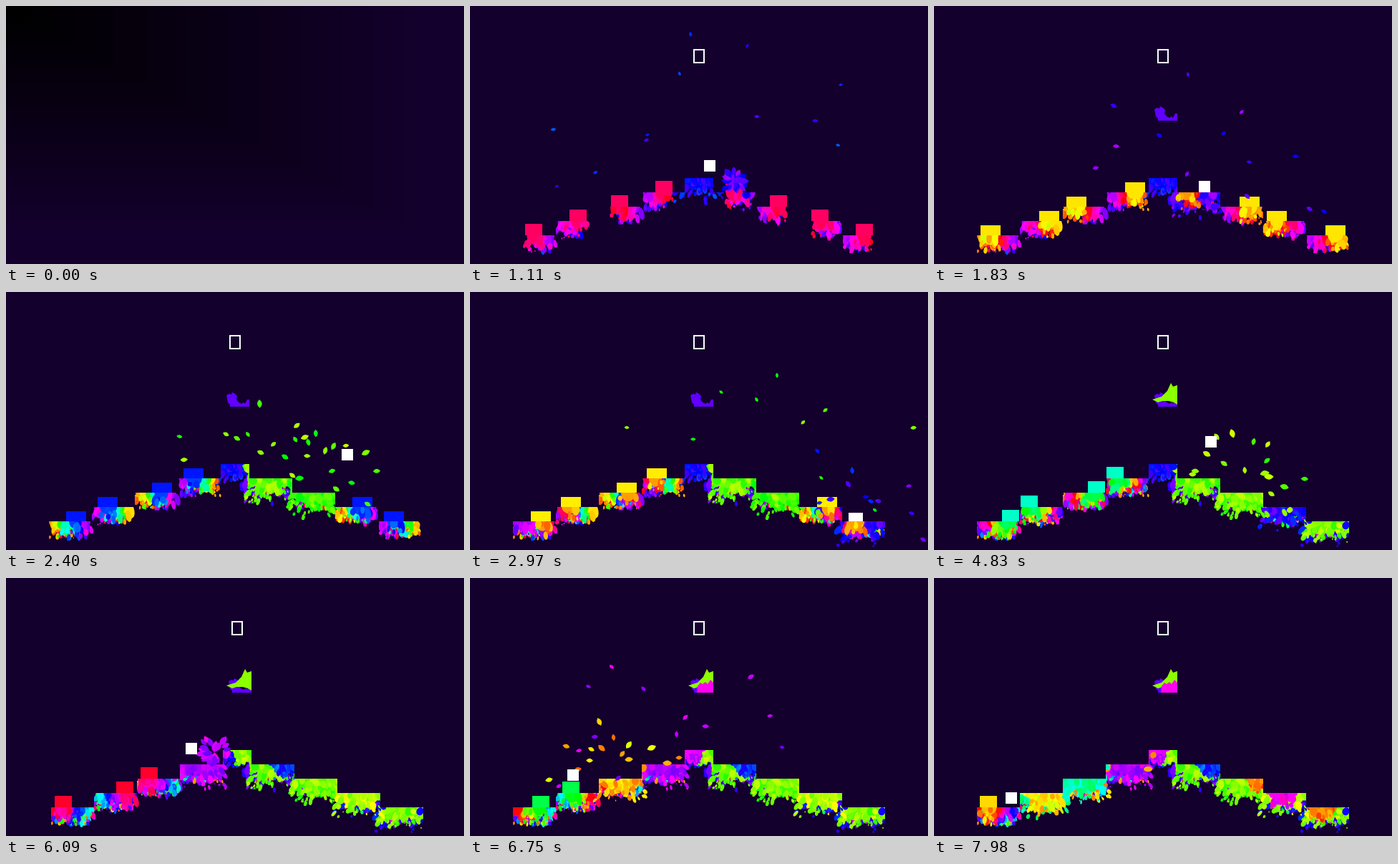
An HTML page with a canvas for the animation above (8 s loop, 640 px wide and 360 px high).

```html
<!DOCTYPE html>
<html lang="en">
<head>
<meta charset="utf-8">
<title>Paint hopper</title>
<style>
  html, body { margin: 0; width: 100%; height: 100%; overflow: hidden; background: #14002d; }
  canvas { display: block; width: 100vw; height: 100vh; }
</style>
</head>
<body>
<canvas id="stage" width="640" height="360"></canvas>
<script>
const LOOP = 8000, STEP = 30, INTRO = 60, LAST = 265;
const PARTICLE_LIFE = 36, GRAVITY = 0.436;
const BG = '#14002d';
const ctx = document.getElementById('stage').getContext('2d');
const paintCanvas = document.createElement('canvas');
paintCanvas.width = 640;
paintCanvas.height = 360;
const paint = paintCanvas.getContext('2d');

let seed = 7;
function rand(min = 0, max = 1) {
  seed = (seed + 0x6D2B79F5) | 0;
  let v = Math.imul(seed ^ (seed >>> 15), 1 | seed);
  v = (v + Math.imul(v ^ (v >>> 7), 61 | v)) ^ v;
  return min + (max - min) * (((v ^ (v >>> 14)) >>> 0) / 4294967296);
}
const lerp = (a, b, s) => a + (b - a) * s;
const color = hue => `hsl(${((hue % 360) + 360) % 360} 100% 50%)`;

// The ledges form a symmetric staircase around x = 320.
const level = x => Math.max(0, Math.ceil((Math.abs(x - 320) - 20) / 60));
const surface = x => 240 + 20 * level(x);
const ledgeCenter = x => level(x) ? 320 + Math.sign(x - 320) * (60 * level(x) - 10) : 320;

// Finds the pair of keys around n and the progress between them.
function between(keys, n) {
  let i = 0;
  while (i < keys.length - 2 && keys[i + 1][0] <= n) i++;
  const from = keys[i], to = keys[i + 1];
  return { i, from, to, s: (n - from[0]) / (to[0] - from[0]) };
}

const hueKeys = [[1, 225], [60, 414], [98, 776], [160, 1247], [202, 1430], [265, 1851]];
function walkerHue(n) {
  const { from, to, s } = between(hueKeys, n);
  return lerp(from[1], to[1], s);
}

// Walkers pace their ledge one pixel per step, neighbours mirrored.
const walkers = [
  { end: Infinity }, { end: 225, hue: 155 }, { end: 210, hue: 46 }, { end: 197, hue: 285 },
  { end: 59, hue: 95 }, { end: 66, hue: 105 }, { end: 122, hue: 245 }, { end: 97, hue: 88 }
].map((w, i) => ({
  ...w, dir: i % 2 ? -1 : 1, base: 60 * i + (i % 2 ? 180 : 0) + (i > 3 ? 40 : 0)
}));
function walkerX(w, n) {
  const u = (n + 19) % 72;
  return w.base + w.dir * (72 + Math.min(u, 72 - u));
}

const kills = walkers.filter(w => w.hue)
  .map(w => ({ n: w.end + 2, x: walkerX(w, w.end), hue: w.hue }));
const bursts = [
  ...kills,
  { n: 2, x: 320, hue: 240 }, { n: 34, x: 370, hue: 260 },
  { n: 80, x: 540, hue: 250 }, { n: 150, x: 435, hue: 92 }
];

// step, centre, radius, hue
const splashes = [
  [80, 75, 16, 282], [166, 490, 45, 76], [172, 330, 16, 84], [180, 386, 18, 228],
  [205, 309, 16, 292], [232, 210, 36, 160], [242, 156, 32, 55],
  [250, 487, 19, 302], [250, 542, 18, 27], [250, 452, 14, 27]
];

const blobs = Array.from({ length: LAST + 1 }, () => []);
function addBlob(n, x, y, rx, ry, turn, hue) {
  if (n <= LAST) blobs[n].push([x, y, rx, ry, turn, color(hue)]);
}

// Drops and streaks fanning downwards from a hit on a ledge.
function addDrops(n, cx, spread, depth, count, hue) {
  for (let i = 0; i < count; i++) {
    const dx = rand(-spread, spread), down = rand() * rand(0.5, 1);
    const r = rand(1, 5.5) * (1 - 0.6 * down);
    addBlob(n, cx + dx, surface(cx) + 3 + depth * down, r, r * rand(1, 2.2), -dx / 50, hue + rand(-20, 20));
  }
}

function addSplash(n, cx, radius, hue) {
  for (let dx = -radius; dx <= radius; dx += 4) {
    const x = cx + dx;
    if (level(x) !== level(cx)) continue;
    const depth = 21 * (1 - Math.abs(dx) / radius) * rand(0.75, 1.1);
    addBlob(n, x, surface(x), 4, depth + 2, 0, hue + rand(-5, 5));
  }
  const spread = Math.min(radius * 0.8, 36);
  addDrops(n, cx, spread, radius > 30 ? 34 : 20, spread * 1.8, hue);
}

const particles = [];
function addBurst({ n, x, hue }) {
  const y = surface(x) - 16, count = 26;
  for (let i = 0; i < count; i++) {
    const angle = (i + rand()) / count * Math.PI * 2, speed = rand(2, 8.5);
    const p = {
      start: n, x, y, vx: Math.cos(angle) * speed, vy: Math.sin(angle) * speed,
      size: rand(5.5, 8), hue: hue + rand(-22, 22), end: n + PARTICLE_LIFE
    };
    for (let age = 1; age < PARTICLE_LIFE; age++) {
      const q = place(p, age);
      if (Math.abs(q.x - 320) < 260 && q.y > surface(q.x)) {
        p.end = n + age;
        addBlob(p.end, q.x, surface(q.x) + rand(2, 9), rand(3, 6), rand(3, 7), rand(0, 3), p.hue);
        break;
      }
    }
    particles.push(p);
  }
  addSplash(n + 3, ledgeCenter(x), 45, hue);
}
function place(p, age) {
  return { x: p.x + p.vx * age, y: p.y + p.vy * age + 0.06 * age * age };
}

for (let n = 6; n <= LAST; n += 6) {
  for (const w of walkers) {
    if (n > w.end) continue;
    const x = walkerX(w, n), hue = walkerHue(n);
    addBlob(n, x, surface(x), rand(9, 13), rand(9, 14), 0, hue);
    addDrops(n, x, 13, 24, 9, hue);
  }
}
bursts.forEach(addBurst);
splashes.forEach(s => addSplash(...s));

const ledges = new Path2D();
for (let i = -4; i <= 4; i++) {
  const w = i ? 60 : 40, x = ledgeCenter(320 + 55 * i) - w / 2;
  ledges.rect(x, surface(x + w / 2), w, 120);
}

// Splashes on the floating block
const floating = [
  { n: 38, fill: '#6000ff', d: 'M308 144l4-2 3 1 1-3 4 2 3 3-1 5 3 4 4 2 3-2 2 2 3-6h3v10h-27v-3l-3-3z' },
  { n: 114, fill: '#8cff00', d: 'M305 150l13-4 8-8 5-11 3 5 6-2v27l-5-3-7-2h-9l-6 2z' },
  { n: 210, fill: '#ff00f0', d: 'M317 160l1-9 4-5 3 2 4-3 3 3 4-6 4 4v14z' }
].map(f => ({ ...f, path: new Path2D(f.d) }));

// step and x of each landing; the arc between follows from gravity
const landings = [
  [1, 320], [24, 320], [44, 345], [60, 378], [66, 435], [98, 539], [122, 475], [136, 440],
  [148, 430], [178, 322], [197, 288], [210, 205], [225, 140], [243, 100], [257, 118], [268, 104]
];
function feet([n, x]) {
  return surface(x) - (walkers.some(w => w.end === n) ? 13 : 0);
}
function drawPlayer(n) {
  const { i, from, to, s } = between(landings, n);
  const time = to[0] - from[0], rise = GRAVITY / 2 * time * time * s * (1 - s);
  const x = lerp(from[1], to[1], s), y = lerp(feet(from), feet(to), s) - rise;
  const squashed = i > 0 && from[0] - landings[i - 1][0] > 25 && n === from[0];
  const w = squashed ? 20 : 16, h = squashed ? 12 : 16;
  ctx.fillStyle = '#fff';
  ctx.fillRect(Math.round(x - w / 2), Math.round(y - h), w, h);
}

function drawWalkers(n) {
  const squashed = (n + 16) % 19 < 4;
  const w = squashed ? 28 : 24, h = squashed ? 14 : 16;
  ctx.fillStyle = color(walkerHue(n));
  for (const walker of walkers) {
    if (n >= walker.end) continue;
    const x = walkerX(walker, n);
    ctx.fillRect(x - w / 2, surface(x) - h, w, h);
  }
}

function drawParticles(n) {
  for (const p of particles) {
    const age = n - p.start;
    if (age < 0 || n >= p.end) continue;
    const { x, y } = place(p, age);
    const len = p.size * (1 - age / PARTICLE_LIFE * 0.5), wide = len * 1.15;
    ctx.save();
    ctx.translate(x, y);
    ctx.rotate(Math.atan2(p.vy + 0.12 * age, p.vx));
    ctx.fillStyle = color(p.hue);
    ctx.beginPath();
    ctx.moveTo(-len, 0);
    ctx.quadraticCurveTo(0, -wide, len, 0);
    ctx.quadraticCurveTo(0, wide, -len, 0);
    ctx.fill();
    ctx.restore();
  }
}

let painted = 0;
function paintUpTo(n) {
  if (n < painted) {
    paint.clearRect(0, 0, 640, 360);
    painted = 0;
  }
  paint.save();
  paint.clip(ledges);
  while (painted < n) {
    painted++;
    for (const [x, y, rx, ry, turn, fill] of blobs[painted]) {
      paint.fillStyle = fill;
      paint.beginPath();
      paint.ellipse(x, y, rx, ry, turn, 0, Math.PI * 2);
      paint.fill();
    }
  }
  paint.restore();
}

function shake(n) {
  const hit = kills.find(k => n >= k.n && n < k.n + 8);
  if (!hit) return [0, 0];
  const turn = (n - hit.n + 1) * Math.PI / 2;
  return [-3 * Math.round(Math.cos(turn + Math.PI / 2 * 3 - Math.PI / 2)), 3 * Math.round(Math.sin(turn + Math.PI))];
}

function drawIntro() {
  for (let s = 1; s >= 0; s -= 0.025) {
    ctx.fillStyle = `rgb(${20 * s} 0 ${45 * s})`;
    ctx.fillRect(0, 0, 20 + 580 * s, 15 + 310 * s);
  }
}

function drawScene(n) {
  paintUpTo(n);
  ctx.save();
  ctx.translate(...shake(n));
  ctx.drawImage(paintCanvas, 0, 0);
  for (const f of floating) {
    if (n < f.n) continue;
    ctx.fillStyle = f.fill;
    ctx.fill(f.path);
  }
  ctx.strokeStyle = '#fff';
  ctx.lineWidth = 2;
  ctx.strokeRect(313, 61, 14, 18);
  drawWalkers(n);
  drawParticles(n);
  drawPlayer(n);
  ctx.restore();
}

const begin = performance.now();
function tick() {
  const t = (performance.now() - begin) % LOOP;
  ctx.fillStyle = BG;
  ctx.fillRect(0, 0, 640, 360);
  if (t < INTRO) drawIntro();
  else drawScene(Math.min(LAST, Math.floor((t - INTRO) / STEP) + 1));
  requestAnimationFrame(tick);
}
tick();
</script>
</body>
</html>
```
